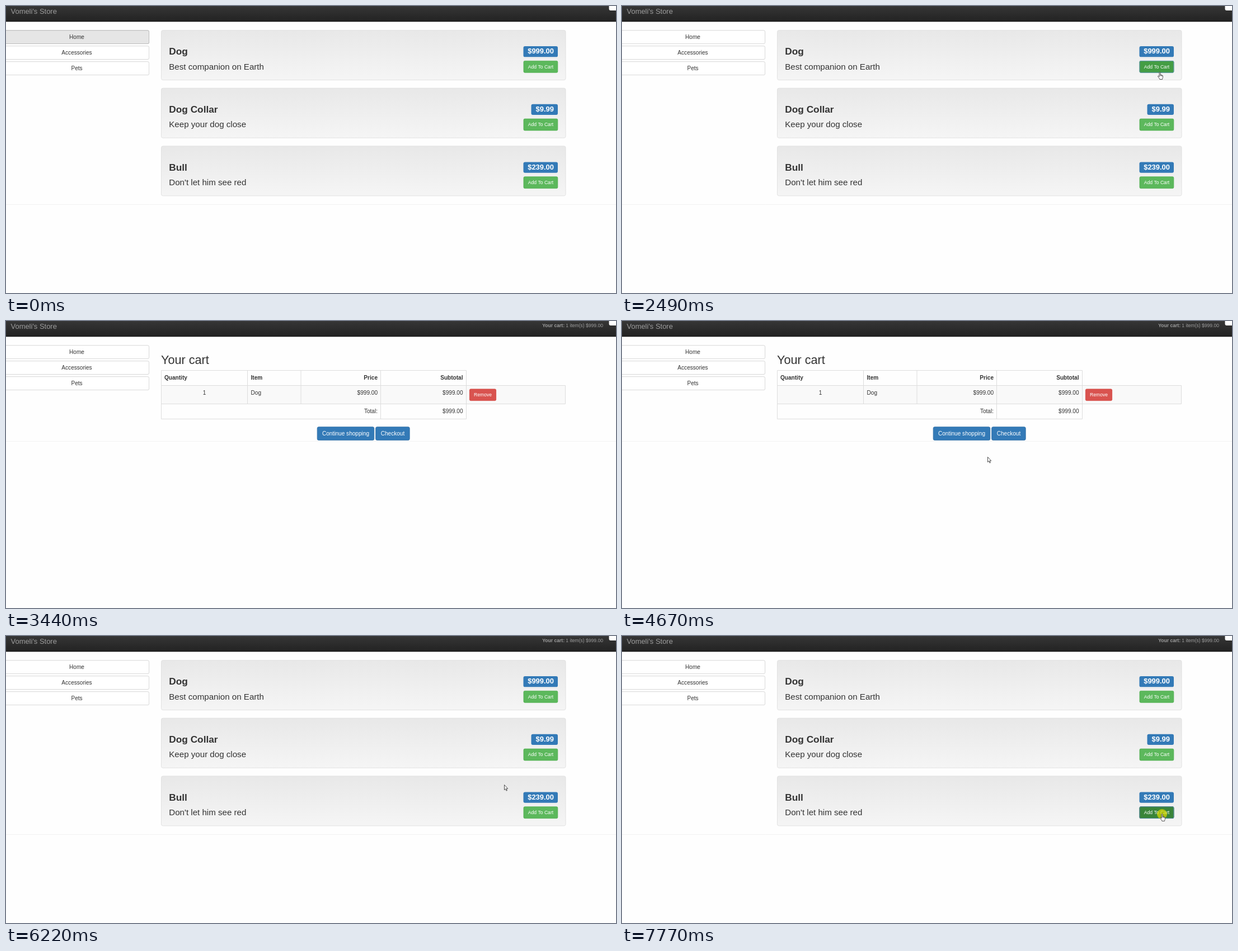
An HTML page for the animation above (8 s loop, 1090 px wide and 514 px high).

```html
<!DOCTYPE html>
<html lang="en">
<head>
<meta charset="utf-8">
<title>Store</title>
<style>
html, body { margin: 0; width: 100%; height: 100%; overflow: hidden; background: #fefefe; }
svg { display: block; width: 1090px; height: 514px; font: 10.08px "Liberation Sans", Arial, sans-serif; fill: #333; }
.mid { text-anchor: middle; }
.end { text-anchor: end; }
.bold { font-weight: bold; }
.white { fill: #fff; }
.small { font-size: 8.64px; }
.nav { fill: #9d9d9d; }
.brand { font-size: 12.96px; }
.tally { font-size: 8.57px; }
.head { font-size: 21.6px; }
.name { font-size: 17.28px; font-weight: bold; }
.lead { font-size: 15.12px; }
.price { font-size: 12.96px; font-weight: bold; }
.plain { fill: #fff; stroke: #ccc; }
.active { fill: #e6e6e6; stroke: #adadad; }
.blue { fill: #337ab7; stroke: #2e6da4; }
.blue-hover { fill: #286090; stroke: #204d74; }
.green { fill: #5cb85c; stroke: #4cae4c; }
.green-hover { fill: #449d44; stroke: #398439; }
.green-press { fill: #398439; stroke: #255625; }
.red { fill: #d9534f; stroke: #d43f3a; }
.ring { fill: none; stroke: #6f9fd8; }
.line { fill: none; stroke: #ddd; }
.rule { stroke: #f2f2f2; }
.pointer { fill: #fff; stroke: #222; stroke-width: .8; stroke-linejoin: round; }

/* Every state change is a hard cut on one shared 8 s clock. */
.page, .tally, .store, .cart, .home-on, .dog-hover, .dog-focus, .bull-hover,
.press, .shop-hover, .status, .arrow, .hand, .cursor {
  animation: 8s step-end infinite;
}
.page { animation-name: page; }
.tally { animation-name: tally; }
.store { animation-name: store; }
.cart { animation-name: cart; }
.home-on { animation-name: home-on; }
.dog-hover { animation-name: dog-hover; }
.dog-focus { animation-name: dog-focus; }
.bull-hover { animation-name: bull-hover; }
.press { animation-name: press; }
.shop-hover { animation-name: shop-hover; }
.status { animation-name: status; }
.arrow { animation-name: arrow; }
.hand { animation-name: hand; }
.cursor { animation-name: move; }

@keyframes page { 0%, 43% { opacity: 1 } 35% { opacity: 0 } 100% { opacity: 1 } }
@keyframes tally { 0% { opacity: 0 } 43%, 100% { opacity: 1 } }
@keyframes store { 0%, 77.75%, 100% { opacity: 1 } 35% { opacity: 0 } }
@keyframes cart { 0%, 77.75%, 100% { opacity: 0 } 43% { opacity: 1 } }
@keyframes home-on { 0% { opacity: 1 } 19.375%, 100% { opacity: 0 } }
@keyframes dog-hover { 0%, 35%, 100% { opacity: 0 } 23.25% { opacity: 1 } }
@keyframes dog-focus { 0%, 35%, 100% { opacity: 0 } 27% { opacity: 1 } }
@keyframes bull-hover { 0% { opacity: 0 } 85.5%, 100% { opacity: 1 } }
@keyframes press { 0% { opacity: 0 } 97.125%, 100% { opacity: 1 } }
@keyframes shop-hover { 0%, 77.75%, 100% { opacity: 0 } 62% { opacity: 1 } }
@keyframes status { 0%, 74.125%, 100% { opacity: 0 } 66.125% { opacity: 1 } 70.125% { opacity: .5 } }
@keyframes arrow {
  0%, 23.25%, 62%, 85.5%, 100% { opacity: 0 }
  15.375%, 46.625%, 70.125% { opacity: 1 }
}
@keyframes hand {
  0%, 15.375%, 39%, 70.125% { opacity: 0 }
  7.75%, 23.25%, 62%, 85.5%, 100% { opacity: 1 }
}
@keyframes move {
  0%, 7.75% { transform: translate(1013px, 158px) }
  11.5% { transform: translate(1001px, 155px) }
  15.375% { transform: translate(976px, 144px) }
  19.375% { transform: translate(968px, 125px) }
  23.25% { transform: translate(957px, 111px) }
  31.125% { transform: translate(957px, 118px) }
  35% { transform: translate(992px, 110px) }
  46.625% { transform: translate(489px, 1px) }
  50.5% { transform: translate(470px, 30px) }
  54.375% { transform: translate(666px, 248px) }
  58.375% { transform: translate(653px, 243px) }
  62% { transform: translate(621px, 198px) }
  66.125% { transform: translate(617px, 196px) }
  70.125% { transform: translate(861px, 290px) }
  74.125% { transform: translate(891px, 277px) }
  77.75% { transform: translate(890px, 266px) }
  81.5% { transform: translate(899px, 257px) }
  85.5% { transform: translate(965px, 325px) }
  89.25% { transform: translate(962px, 320px) }
  93.125%, 100% { transform: translate(961px, 318px) }
}
</style>
</head>
<body>
<svg viewBox="0 0 1090 514">
  <defs>
    <linearGradient id="bar" x2="0" y2="1">
      <stop stop-color="#363636"/><stop offset="1" stop-color="#222"/>
    </linearGradient>
    <linearGradient id="well" x2="0" y2="1">
      <stop stop-color="#e8e8e8"/><stop offset="1" stop-color="#f5f5f5"/>
    </linearGradient>
  </defs>

  <g class="page">
    <rect width="1090" height="28" fill="url(#bar)"/>
    <path d="M0 27.8H1090" stroke="#101010" stroke-width=".7"/>
    <text class="nav brand" x="8.5" y="14">Vomeli's Store</text>
    <text class="nav tally end" x="1067" y="11.3"><tspan class="bold">Your cart:</tspan> 1 item(s) $999.00</text>
    <rect class="white" x="1077.5" y="-5" width="20" height="13" rx="3"/>
    <g id="menu"></g>
  </g>

  <g class="store" id="store"></g>

  <g class="cart">
    <text class="head" x="277" y="76.5">Your cart</text>
    <path fill="#f9f9f9" d="M277.5 115.5H999.5V148.5H277.5Z"/>
    <path class="line" d="M277.5 88.5H822.5V175.5H277.5ZM277.5 115.5H999.5V148.5H277.5M431.5 88.5V148.5M527 88.5V148.5M669.5 88.5V175.5"/>
    <g class="bold">
      <text x="283" y="105.2">Quantity</text>
      <text x="437.5" y="105.2">Item</text>
      <text class="end" x="664" y="105.2">Price</text>
      <text class="end" x="816.5" y="105.2">Subtotal</text>
    </g>
    <text class="mid" x="354.5" y="132">1</text>
    <text x="437.5" y="132">Dog</text>
    <g class="end">
      <text x="664" y="132">$999.00</text>
      <text x="816.5" y="132">$999.00</text>
      <text x="664" y="165">Total:</text>
      <text x="816.5" y="165">$999.00</text>
    </g>
    <g id="actions"></g>
    <path class="rule" d="M0 215.5H1090"/>
  </g>

  <g class="status">
    <path fill="#dee1e6" d="M0 498H94Q97 498 97 501V514H0Z"/>
    <text class="small" x="5" y="509" fill="#5f6368">localhost:60000</text>
  </g>

  <circle class="press" cx="965" cy="319" r="9" fill="#dcdc00" fill-opacity=".7"/>
  <g class="cursor">
    <path class="pointer arrow" d="M.5 .6V9.7L2.6 7.8L4 11.2L5.4 10.6L4 7.3H6.7Z"/>
    <path class="pointer hand" d="M3.1 8.7V1.5A.95 .95 0 0 1 5 1.5V5Q6.2 4.8 6.7 5.6Q7.8 5.4 8.2 6.2Q9.4 6.2 9.4 7.4V9.5C9.4 11 8.6 11.6 8.5 13.4H3.9C3.7 11.8 1.6 10 .7 8.4C.2 7.3 1.4 6.8 2.2 7.7ZM5 5V7.4M6.7 5.6V7.6M8.2 6.2V7.9"/>
  </g>
</svg>

<script>
const fill = (id, html) => { document.getElementById(id).innerHTML = html; };

// Box from (x, y) to (right, bottom) with the 1px border inside.
const box = (cls, x, y, right, bottom, r = 2.5) =>
  `<rect class="${cls}" x="${x + .4}" y="${y + .4}" width="${right - x - .8}" height="${bottom - y - .8}" rx="${r}" stroke-width=".8"/>`;

const label = (cls, x, y, text) => `<text class="${cls}" x="${x}" y="${y}">${text}</text>`;

fill('menu', ['Home', 'Accessories', 'Pets'].map((text, i) => {
  const y = 43.3 + i * 28;
  return box('plain', -3, y, 256, y + 24.7) +
    (i ? '' : box('active home-on', -3, y, 256, y + 24.7)) +
    label('mid', 126.5, y + 15.6, text);
}).join(''));

const goods = [
  ['Dog', 'Best companion on Earth', '$999.00', 924.5],
  ['Dog Collar', 'Keep your dog close', '$9.99', 938.5],
  ['Bull', "Don't let him see red", '$239.00', 924.5],
];

// Extra looks laid over a plain button, shown in turn.
const overlays = {
  'Dog': [['green-hover dog-hover'], ['ring dog-focus']],
  'Bull': [['green-hover bull-hover'], ['green-press press'], ['ring press']],
};

fill('store', goods.map(([name, lead, price, left], i) => {
  const y = 43.3 + i * 103.7;
  const button = cls => box(cls, 924.6, y + 54.7, 986.2, y + 76.3, 2);
  return `<rect x="277.5" y="${y + .2}" width="722.5" height="89" rx="2.9" fill="url(#well)" stroke="#dcdcdc" stroke-width=".8"/>` +
    label('name', 291.3, y + 44, name) +
    label('lead', 291.3, y + 70.4, lead) +
    `<rect x="${left}" y="${y + 28.7}" width="${986 - left}" height="19.3" rx="2.9" fill="#337ab7"/>` +
    label('price white end', 979, y + 42, price) +
    button('green') +
    (overlays[name] || []).map(([cls]) => button(cls)).join('') +
    label('small white mid', 955.5, y + 68.2, 'Add To Cart');
}).join('') + '<path class="rule" d="M0 355.5H1090"/>');

fill('actions',
  box('red', 828, 121.5, 876, 143, 2) + label('small white mid', 852, 135, 'Remove') +
  box('blue', 555.8, 189.3, 658.2, 213.8) + box('blue-hover shop-hover', 555.8, 189.3, 658.2, 213.8) +
  label('white mid', 607, 205, 'Continue shopping') +
  box('blue', 660.2, 189.3, 721.6, 213.8) + label('white mid', 691, 205, 'Checkout'));
</script>
</body>
</html>
```
